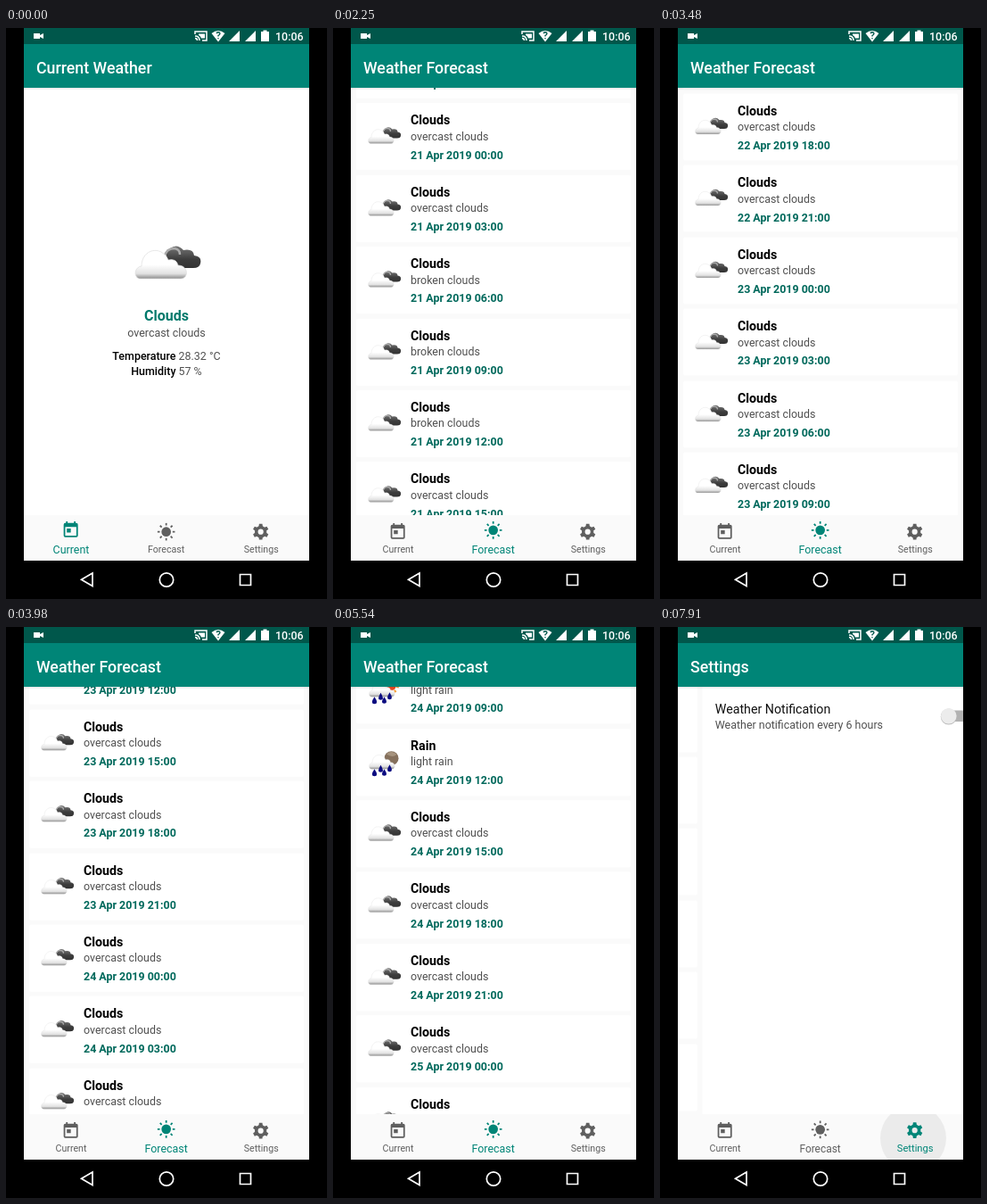
An HTML page that plays this animation: 360x640 px, repeating every 8 s.

```html
<!DOCTYPE html>
<html lang="en">
<head>
<meta charset="utf-8">
<title>Weather app</title>
<style>
  html, body { margin: 0; width: 100%; height: 100%; overflow: hidden; background: #000; }
  #stage { position: relative; width: 360px; height: 640px; overflow: hidden; background: #000;
    font: 12.44px/20px Roboto, sans-serif; color: #505050; white-space: nowrap; }
  #stage div, #stage svg, #stage span { position: absolute; }
  .bar { left: 20px; width: 320px; }
  #status { top: 0; height: 18px; background: #00574b; }
  #toolbar { top: 18px; height: 49px; background: #008577; box-shadow: 0 1px 2px rgba(0,0,0,.13); }
  #title { left: 14px; top: 16.6px; font-size: 17.78px; font-weight: 500; color: #fff; }
  #clock { left: 302px; top: -.5px; font-weight: 500; color: #fff; }
  #view { top: 67px; height: 479px; overflow: hidden; background: #fff; }
  .page { top: 0; width: 320px; height: 479px; overflow: hidden; background: #fff; }
  .mid { left: 0; width: 320px; text-align: center; }
  .mid b { font-weight: 500; color: #000; }
  .card { left: 6px; width: 308px; height: 75px; border-radius: 2px; background: #fff; }
  .card span { left: 61px; }
  .card .name { top: 9px; font-size: 14.22px; font-weight: 700; color: #000; }
  .card .desc { top: 27.4px; }
  .card .date { top: 48.3px; font-weight: 700; color: #00695c; }
  #nav { top: 546px; height: 51px; overflow: hidden; background: #fafafa; }
  .tab { top: 0; width: 106px; height: 51px; color: #5f5f5f; }
  .tab.on { color: #008577; }
  .tab svg { left: 42.3px; top: 8px; }
  .tab span { left: 0; width: 106px; top: 28.6px; text-align: center; }
  #ripple { border-radius: 50%; background: #000; }
</style>
</head>
<body>
<div id="stage">
  <svg width="0" height="0">
    <defs>
      <linearGradient id="light" x2="0" y2="1">
        <stop offset=".5" stop-color="#fff"/><stop offset=".82" stop-color="#e2e2e2"/><stop offset="1" stop-color="#8c8c8c"/>
      </linearGradient>
      <linearGradient id="dark" x2="0" y2="1">
        <stop offset="0" stop-color="#777"/><stop offset=".6" stop-color="#3d3d3d"/><stop offset="1" stop-color="#333"/>
      </linearGradient>
      <path id="puff" d="M7 39C-1 39-1 26 8 25 8 11 20 4 30 9q6 3 8 9 9-2 11 6c12 0 12 15 3 15Z"
        fill="url(#light)" stroke="#ddd" stroke-width=".7"/>
      <symbol id="clouds" viewBox="0 0 76 44" overflow="visible">
        <path d="M37 21q-4-10 3-16 8-6 15 2 11-2 12 6 9 1 7 9-1 5-8 5H44Z" fill="url(#dark)"/>
        <path d="M34 15q1-10 11-10 6 1 6 7" fill="none" stroke="#aaa" stroke-width="2.5"/>
        <use href="#puff"/>
      </symbol>
      <g id="rain">
        <use href="#puff" x="2" y="-1"/>
        <path d="M15 38q-11 16 0 16 11 0 0-16M29 29q-10 16 0 16 10 0 0-16M37 38q-10 15 0 15 10 0 0-15M49 28q-10 16 0 16 10 0 0-16"
          fill="#0c0c80"/>
      </g>
      <symbol id="day" viewBox="0 0 76 44" overflow="visible">
        <circle cx="53" cy="14" r="14" fill="none" stroke="#f6a13a" stroke-width="6" stroke-dasharray="4 7"/>
        <circle cx="53" cy="14" r="10" fill="#ea4a22"/><use href="#rain"/>
      </symbol>
      <symbol id="night" viewBox="0 0 76 44" overflow="visible">
        <circle cx="53" cy="14" r="16" fill="#85705c"/>
        <path d="M42 4q12-9 23 1-10 10-23-1" fill="#a6937e"/><use href="#rain"/>
      </symbol>
    </defs>
  </svg>

  <div id="view" class="bar"><div id="pager">
    <div class="page" style="left:0">
      <svg style="left:124px;top:175px" width="76" height="44"><use href="#clouds"/></svg>
      <span class="mid" style="top:246px;font-size:16px;font-weight:700;color:#00796b">Clouds</span>
      <span class="mid" style="top:265px">overcast clouds</span>
      <span class="mid" style="top:291px"><b>Temperature</b> 28.32 °C</span>
      <span class="mid" style="top:308px"><b>Humidity</b> 57 %</span>
    </div>
    <div class="page" style="left:320px;background:#fafafa">
      <div id="list"></div>
      <svg width="320" height="479" style="left:0;top:0"><ellipse id="glow" cx="160" rx="480" fill="#008577"/></svg>
    </div>
    <div class="page" style="left:640px">
      <span style="left:14px;top:15px;font-size:14.22px;color:#111">Weather Notification</span>
      <span style="left:14px;top:33px">Weather notification every 6 hours</span>
      <svg width="50" height="30" style="left:262px;top:18px">
        <rect x="8" y="8.5" width="32" height="12.5" rx="6.2" fill="#b2b2b2"/>
        <circle cx="14" cy="15.6" r="9" fill="#bbb"/><circle cx="14" cy="14.8" r="8.8" fill="#ececec"/>
      </svg>
    </div>
  </div></div>

  <div id="toolbar" class="bar"><span id="title"></span></div>
  <div id="status" class="bar"></div>
  <div id="nav" class="bar"><div id="ripple"></div></div>

  <svg width="360" height="640" style="left:0;top:0" fill="#fff">
    <path d="M31 6h7v2l4-2v6l-4-2v2h-7zM250 15h12V3zM268 15h12V3zM286 4h2.500V2.500h4V4H295v11h-9z"/>
    <path d="M212 7V4h13v10h-5M212 9q5 0 5 5M212 11.500q2.500 0 2.500 2.500" fill="none" stroke="#fff" stroke-width="1.500"/>
    <path d="M216 6.500h7v5h-4q-1-3-3-3.500z"/>
    <path d="M230.500 6q7.500-6 15 0L238 15.500z"/>
    <path d="M236 6q2-2.500 4 0 0 1.500-2 2.500v1M238 11v1.200" fill="none" stroke="#00574b" stroke-width="1.300"/>
    <g fill="none" stroke="#fff" stroke-width="1.700">
      <path d="M97 611v14.500L84.500 618.200zM262.500 612.500h12v12h-12z"/><circle cx="180" cy="618.500" r="7.700"/>
    </g>
  </svg>
  <span id="clock">10:06</span>
</div>

<script>
const $ = id => document.getElementById(id);
const clamp = x => Math.min(1, Math.max(0, x));
const LOOP = 8000, PITCH = 80.4, MAX_SCROLL = 2739.6;

// The forecast: 40 entries, three hours apart
const broken = [8, 9, 10, 39], rain = { 1: 'day', 2: 'night', 33: 'day', 34: 'night' };
$('list').innerHTML = Array.from({ length: 40 }, (_, i) => {
  const hours = 6 + 3 * i, hour = String(hours % 24).padStart(2, '0');
  const desc = rain[i] ? 'light rain' : broken.includes(i) ? 'broken clouds' : 'overcast clouds';
  return `<div class="card" style="top:${4 + PITCH * i}px">
    <svg style="left:13px;top:26px" width="38" height="22" overflow="visible"><use href="#${rain[i] || 'clouds'}"/></svg>
    <span class="name">${rain[i] ? 'Rain' : 'Clouds'}</span><span class="desc">${desc}</span>
    <span class="date">${20 + Math.floor(hours / 24)} Apr 2019 ${hour}:00</span></div>`;
}).join('');

const icons = [
  '<path d="M19 3h-1V1h-2v2H8V1H6v2H5q-2 0-2 2v14q0 2 2 2h14q2 0 2-2V5q0-2-2-2zm0 16H5V8h14zM7 10h5v5H7z"/>',
  '<circle cx="12" cy="12" r="6"/>' + [0, 45, 90, 135, 180, 225, 270, 315].map(a =>
    `<path d="M11 1h2v3h-2z" transform="rotate(${a} 12 12)"/>`).join(''),
  '<circle cx="12" cy="12" r="5.500" fill="none" stroke="currentColor" stroke-width="4"/>' + [0, 60, 120, 180, 240, 300].map(a =>
    `<path d="M10 2h4l.6 4h-5.200z" transform="rotate(${a} 12 12)"/>`).join('')
];
const titles = ['Current Weather', 'Weather Forecast', 'Settings'];
const tabs = ['Current', 'Forecast', 'Settings'].map((name, i) => {
  const tab = document.createElement('div');
  tab.className = 'tab';
  tab.style.left = i * 106.6 + 'px';
  tab.innerHTML = `<svg width="21.33" height="21.33" viewBox="0 0 24 24" fill="currentColor">${icons[i]}</svg><span>${name}</span>`;
  $('nav').append(tab);
  return { tab, icon: tab.firstChild, label: tab.lastChild };
});

// The screen only refreshes in bursts, [first, last, count], on a 10 ms clock
const bursts = [[500, 1010, 6], [1420, 1420, 1], [1720, 2450, 8], [2550, 2860, 4], [3080, 3880, 9],
  [3980, 4580, 7], [4830, 5540, 8], [5640, 5940, 4], [6200, 6910, 8], [7910, 7910, 1]];
function refreshed(t) {
  const burst = bursts.filter(b => b[0] <= t).pop();
  if (!burst) return 0;
  const [first, last, count] = burst;
  if (t >= last) return last;
  const step = (last - first) / (count - 1);
  const index = Math.floor((t - first + 5) / step);
  return Math.round((first + index * step) / 10) * 10;
}

const fling = (t, from, to, start, end) =>
  from + (to - from) * (1 - (1 - clamp((t - start) / (end - start))) ** 2.52);

function scrollAt(t) {
  if (t < 1420) return 0;
  if (t < 1720) return 14;
  if (t < 3080) return fling(t, 14, 570, 1640, 2860);
  if (t < 4830) return fling(t, 570, 2300, 3000, 4580);
  if (t < 6200) return fling(t, 2300, 2722, 4815, 5940);
  return t < 6300 ? 2732 : MAX_SCROLL;
}

// Overscroll glow: a short pull, then a decelerating retreat
function glowAt(t) {
  if (t < 6200 || t >= 6900) return 0;
  return t < 6300 ? .35 : (1 - clamp((t - 6300) / 600)) ** 2;
}

function draw(now) {
  const t = refreshed(now % LOOP);
  const active = t < 500 ? 0 : t < 7910 ? 1 : 2;
  const age = active ? t - (active === 1 ? 384 : 7794) : 1000;
  const slide = 1 - (1 - clamp(age / 300)) ** 5;
  const page = active ? active - 1 + slide : 0;
  $('pager').style.transform = `translateX(${-320 * page}px)`;
  $('list').style.transform = `translateY(${-scrollAt(t)}px)`;
  $('title').textContent = titles[active];

  const grow = clamp((age - 60) / 200);
  tabs.forEach(({ tab, icon, label }, i) => {
    const on = i === active ? grow : i === active - 1 ? 1 - grow : 0;
    tab.classList.toggle('on', i === active);
    icon.style.transform = `translateY(${-1.8 * on}px)`;
    label.style.fontSize = 10.67 + 1.77 * on + 'px';
  });

  const r = 30 + 7 * age / 116, x = active === 2 ? 264 : 160;
  Object.assign($('ripple').style, {
    left: x - r + 'px', top: 27 - r + 'px', width: 2 * r + 'px', height: 2 * r + 'px',
    opacity: .06 * (1 - clamp((age - 300) / 300))
  });

  const glow = glowAt(t);
  $('glow').setAttribute('ry', 480 * glow);
  $('glow').setAttribute('cy', 479 + 416 * glow);
  $('glow').setAttribute('opacity', .3 * Math.sqrt(glow));
}

const begin = performance.now();
(function tick() {
  draw(performance.now() - begin);
  requestAnimationFrame(tick);
})();
</script>
</body>
</html>
```
